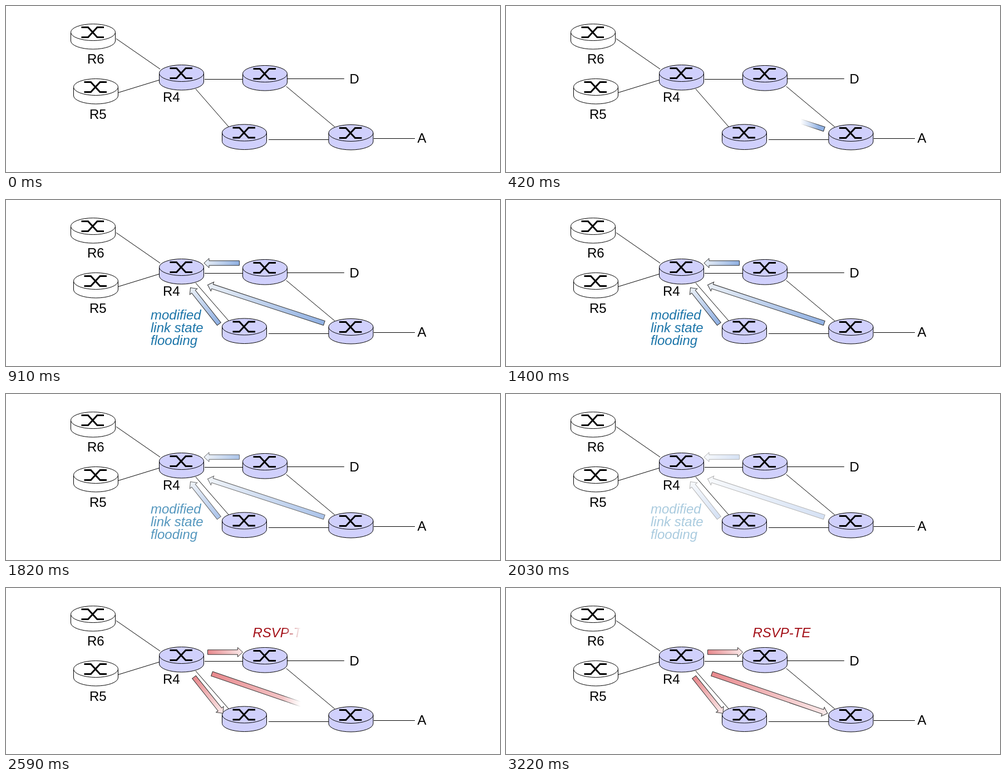
Write an HTML page that moves like this. It is 888 by 300 pixels and loops after 3850 ms.

```html
<!DOCTYPE html>
<html lang="en">
<head>
<meta charset="utf-8">
<title>Link state flooding and RSVP-TE</title>
<style>
  html, body { margin: 0; width: 100%; height: 100%; overflow: hidden; background: #fff; }
  svg { position: absolute; left: 0; top: 0; width: 888px; height: 300px; }
  text { font: 24px "Liberation Sans", Arial, sans-serif; }
  .note text { font-style: italic; }
  .links { stroke: #000; stroke-width: 1; }
  .routers { fill: #fff; stroke: #000; stroke-width: 1; }
  .routers .core { fill: #d0d0fc; }
  .arrow { stroke: #333; stroke-width: 1; }

  /* The loop is 55 ticks of 70 ms; every effect moves in 8 ticks. */
  .layer {
    -webkit-mask-repeat: no-repeat; mask-repeat: no-repeat;
    -webkit-mask-size: 1776px 300px; mask-size: 1776px 300px;
  }
  #flood {
    -webkit-mask-image: linear-gradient(90deg, transparent 888px, #000 920px);
    mask-image: linear-gradient(90deg, transparent 888px, #000 920px);
    animation: wipe-left 3850ms -2ms infinite, fade 3850ms -2ms infinite;
  }
  #signal {
    -webkit-mask-image: linear-gradient(90deg, #000 856px, transparent 888px);
    mask-image: linear-gradient(90deg, #000 856px, transparent 888px);
    animation: wipe-right 3850ms -2ms infinite;
  }
  @keyframes wipe-left {
    0% { -webkit-mask-position: -312px 0; mask-position: -312px 0; }
    9.0909% { -webkit-mask-position: -312px 0; mask-position: -312px 0; animation-timing-function: steps(8); }
    23.6363%, 100% { -webkit-mask-position: -683px 0; mask-position: -683px 0; }
  }
  @keyframes fade {
    0% { opacity: 1; }
    43.6363% { opacity: 1; animation-timing-function: steps(8); }
    58.1818%, 100% { opacity: 0; }
  }
  @keyframes wipe-right {
    0% { -webkit-mask-position: -555px 0; mask-position: -555px 0; }
    58.1818% { -webkit-mask-position: -555px 0; mask-position: -555px 0; animation-timing-function: steps(8); }
    72.7272%, 100% { -webkit-mask-position: -240px 0; mask-position: -240px 0; }
  }
</style>
</head>
<body>
<svg viewBox="0 0 888 300">
  <defs>
    <g id="router">
      <path d="M-40 0V15.5A40 15 0 0 0 40 15.5V0"/>
      <ellipse rx="40" ry="15"/>
      <path d="M-21 -9H-9L7.5 9H19.5M-21 9H-9L7.5 -9H19.5" fill="none" stroke-width="3"/>
    </g>
  </defs>
  <g class="links">
    <path d="M198 59L277 114M202 156.5L278 133M357 132.5H426M506 131.5H608M341 150L400 218M504 145.5L591 218.5M472 241.5H581M661 239.5H735"/>
  </g>
  <g class="routers">
    <use href="#router" x="156.5" y="47.5"/>
    <use href="#router" x="161.5" y="146.5"/>
    <g class="core">
      <use href="#router" x="315.5" y="121.5"/>
      <use href="#router" x="465.5" y="122.5"/>
      <use href="#router" x="428.5" y="229"/>
      <use href="#router" x="620" y="229.5"/>
    </g>
  </g>
  <text x="146" y="104">R6</text>
  <text x="150" y="204">R5</text>
  <text x="282" y="173">R4</text>
  <text x="617.5" y="140">D</text>
  <text x="739.5" y="247">A</text>
</svg>

<svg id="flood" class="layer" viewBox="0 0 888 300">
  <linearGradient id="blue"><stop stop-color="#8fb0e3"/><stop offset="1" stop-color="#ebf0f6"/></linearGradient>
  <g class="note" fill="#1c75a9">
    <text x="260" y="216">modified</text>
    <text x="260" y="239">link state</text>
    <text x="260" y="262">flooding</text>
  </g>
</svg>

<svg id="signal" class="layer" viewBox="0 0 888 300">
  <linearGradient id="red"><stop stop-color="#e8898d"/><stop offset="1" stop-color="#faeaea"/></linearGradient>
  <g class="note" fill="#a31018">
    <text x="443.5" y="89">RSVP-TE</text>
  </g>
</svg>

<script>
  // Block arrow from tail to tip, shaded along its length.
  function arrow(layer, paint, x1, y1, x2, y2) {
    const len = Math.hypot(x2 - x1, y2 - y1);
    const angle = Math.atan2(y2 - y1, x2 - x1) * 180 / Math.PI;
    const neck = len - 9;
    const path = document.createElementNS("http://www.w3.org/2000/svg", "path");
    path.setAttribute("class", "arrow");
    path.setAttribute("fill", `url(#${paint})`);
    path.setAttribute("transform", `translate(${x1} ${y1}) rotate(${angle})`);
    path.setAttribute("d", `M0 -4.2H${neck}V-8.5L${len} 0L${neck} 8.5V4.2H0Z`);
    document.getElementById(layer).append(path);
  }

  arrow("flood", "blue", 419.5, 114, 356, 114);
  arrow("flood", "blue", 572, 222.5, 362.5, 153.5);
  arrow("flood", "blue", 383, 224, 331.5, 158.5);
  arrow("signal", "red", 362.5, 116, 425.5, 116);
  arrow("signal", "red", 370, 155, 578, 226.5);
  arrow("signal", "red", 338, 161, 390, 226.5);
</script>
</body>
</html>
```
